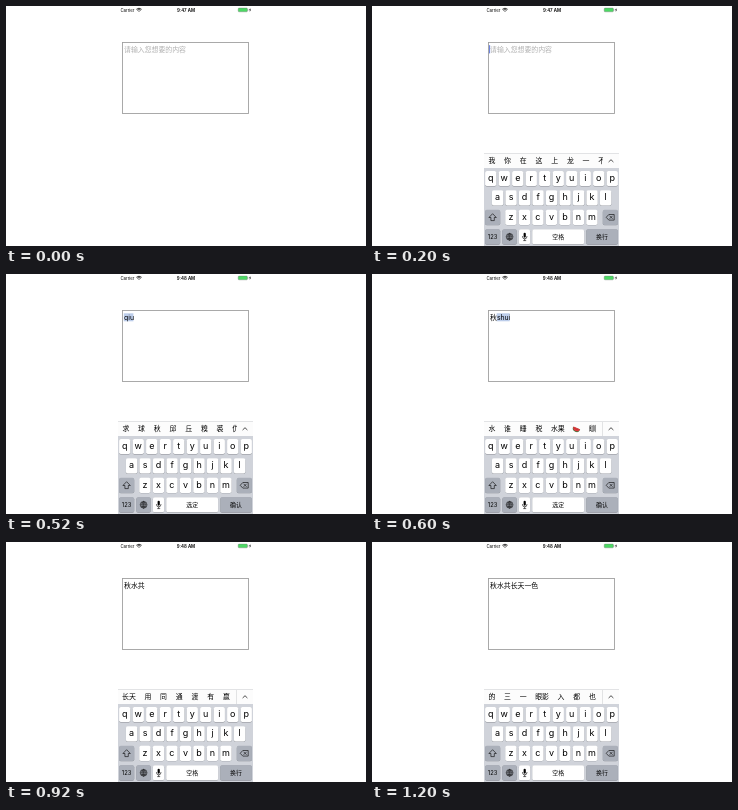
Animation, 360 px wide and 240 px high, one loop 1400 ms. Source, as an HTML page:

```html
<!DOCTYPE html>
<html lang="zh-CN">
<head>
<meta charset="utf-8">
<title>Pinyin typing</title>
<style>
html, body { margin: 0; width: 100%; height: 100%; overflow: hidden; background: #fff; }
svg { display: block; width: 360px; height: 240px; }
text { font-family: Inter, "Noto Sans CJK SC", "Noto Sans CJK", sans-serif; white-space: pre; }
</style>
</head>
<body>
<svg id="stage" viewBox="0 0 360 240">
  <g id="status">
    <text x="114.4" y="5.7" font-size="4.3">Carrier</text>
    <g fill="none" stroke="#000" stroke-width=".8">
      <path d="M130.4 3.3q2.6-2.2 5.2 0M131.3 4.3q1.7-1.4 3.4 0"/>
      <path d="M132.2 4.9h1.6l-.8 .9z" fill="#000" stroke="none"/>
    </g>
    <rect x="232.2" y="2.1" width="9.2" height="3.7" rx=".8" fill="#4cd964" stroke="#777" stroke-width=".4"/>
    <path d="M241.9 3.2v1.5" stroke="#777" stroke-width=".5"/>
    <path d="M244.3 1.9l-1.2 2.3h.9l-.3 1.9 1.3-2.5h-.9z"/>
  </g>
  <rect x="116.5" y="36.5" width="126" height="71" fill="none" stroke="#a0a0a0" stroke-width=".9"/>
  <g id="live"></g>
  <g id="keyboard"></g>
  <g id="labels"></g>
</svg>
<script>
const STEP = 200;
const UNIT = 0.36;   // one phone point in stage pixels
const LEFT = 112;
const HINT = '请输入您想要的内容';
const IDLE = ['空格', '换行'], PICK = ['选定', '确认'];

const scenes = [
  { time: '9:47 AM', hint: true },
  { time: '9:47 AM', hint: true, caret: true, words: '我 你 在 这 上 龙 一 不', keys: IDLE },
  { time: '9:48 AM', marked: 'qiu', markWidth: 9.6, words: '求 球 秋 邱 丘 糗 裘 仇', keys: PICK },
  { time: '9:48 AM', typed: '秋', marked: 'shui', markWidth: 13, words: '水 谁 睡 税 水果 🍉 瞓', keys: PICK },
  { time: '9:48 AM', typed: '秋水共', words: '长天 用 同 通 渡 有 赢', keys: IDLE },
  { time: '9:48 AM', typed: '秋水共长天', words: '一 一色 了 的 于 三 多少', keys: IDLE },
  { time: '9:48 AM', typed: '秋水共长天一色', words: '的 三 一 眼影 入 都 也', keys: IDLE }
];

const $ = id => document.getElementById(id);
const rect = (x, y, w, h, fill, extra = '') =>
  `<rect x="${x}" y="${y}" width="${w}" height="${h}" fill="${fill}" ${extra}/>`;
const text = (s, x, y, size, extra = '') =>
  `<text x="${x}" y="${y}" font-size="${size}" ${extra}>${s}</text>`;
const centered = (s, x, y, size, extra = '') => text(s, x, y, size, 'text-anchor="middle" ' + extra);
const line = (d, width = 0.6, color = '#000') =>
  `<path d="${d}" fill="none" stroke="${color}" stroke-width="${width}"/>`;

const rowTop = row => 164.9 + row * 54 * UNIT;

function key(at, width, row, fill = '#fff') {
  const x = LEFT + at * UNIT, w = width * UNIT, h = 42 * UNIT, y = rowTop(row);
  return rect(x, y + 0.4, w, h, '#898c92', 'rx="1.7"') + rect(x, y, w, h, fill, 'rx="1.7"');
}

function keyboard() {
  const gray = '#abb0ba';
  let out = rect(LEFT, 147, 135, 15.4, '#fcfcfc') + rect(LEFT, 162, 135, 78, '#d0d3da') +
    line('M112 147.5h135', 0.5, '#c6c8cc') + line('M236.6 156l2.4-2.3 2.4 2.3', 0.7);
  [['qwertyuiop', 3], ['asdfghjkl', 22], ['zxcvbnm', 59]].forEach(([letters, start], row) => {
    [...letters].forEach((c, i) => {
      const at = start + i * 37.5;
      out += key(at, 31.5, row) + centered(c, LEFT + (at + 15.75) * UNIT, rowTop(row) + 10.1, 9);
    });
  });
  out += key(3, 42, 2, gray) + key(330, 42, 2, gray) +
    key(3, 42, 3, gray) + key(51, 40, 3, gray) + key(97, 31, 3) +
    key(134, 144, 3) + key(284, 88, 3, gray);
  out += centered('123', 120.6, 232.9, 5.8);
  // shift and delete
  out += line('M120.6 207.7l3.7 3.8h-2v3.1h-3.4v-3.1h-2z');
  out += line('M234.2 211.3l2.6-2.8h5.4v5.6h-5.4zM237.6 209.8l3 3m0-3l-3 3');
  // globe
  out += '<g fill="none" stroke="#000" stroke-width=".5"><circle cx="137.6" cy="230.8" r="3.4"/>' +
    '<ellipse cx="137.6" cy="230.8" rx="1.6" ry="3.4"/>' +
    '<path d="M137.6 227.4v6.8M134.2 230.8h6.8M134.9 229h5.4M134.9 232.6h5.4"/></g>';
  // microphone
  out += rect(151.6, 226.7, 2.2, 5, '#000', 'rx="1.1"') +
    line('M150.5 230v.6a2.2 2.2 0 0 0 4.4 0v-.6M152.7 232.8v1.8M151.2 234.6h3');
  return out;
}

const melon = x => `<g transform="translate(${x} 154.2) rotate(22)">
  <path d="M-3.8 0a3.8 3.8 0 0 0 7.6 0z" fill="#38783c"/>
  <path d="M-3.5-.4a3.4 3.4 0 0 0 7 0z" fill="#e0393e"/>
  <path d="M-1.4.7v.5M.2 1.2v.5M1.5.5v.5" stroke="#5b1518" stroke-width=".4"/></g>`;

function candidates(words) {
  let x = LEFT, out = '';
  for (const word of words.split(' ')) {
    const width = word.length > 1 && word !== '🍉' ? 22 : 15.7, mid = x + width / 2;
    out += word === '🍉' ? melon(mid) : centered(word, mid, 157.3, 6.9);
    x += width;
  }
  const divider = x < 230 ? line('M230.5 148v14', 0.5, '#c8cacd') : '';
  return `<svg x="0" y="0" width="231" height="240">${out}</svg>` + divider;
}

function draw(s) {
  const size = 6.9, { typed = '', marked = '' } = s;
  const end = 118 + typed.length * size;
  let out = centered(s.time, 180, 5.7, 4.4, 'font-weight="600"');
  if (s.hint) out += text(HINT, 118, 45.9, size, 'fill="#b0b0b0"');
  if (s.caret) out += rect(117.2, 39.2, 0.9, 8.2, '#4a66d6');
  if (marked) out += rect(end - 0.2, 39.3, s.markWidth, 8, '#bccdea');
  out += text(typed, 118, 45.9, size) + text(marked, end, 45.9, size);
  $('live').innerHTML = out;

  $('keyboard').style.display = s.keys ? '' : 'none';
  $('labels').innerHTML = s.keys
    ? candidates(s.words) + centered(s.keys[0], 186.2, 232.9, 5.9) + centered(s.keys[1], 230, 232.9, 5.9)
    : '';
}

$('keyboard').innerHTML = keyboard();
let shown = -1;
function tick() {
  const now = Math.floor(performance.now() / STEP) % scenes.length;
  if (now !== shown) draw(scenes[shown = now]);
  requestAnimationFrame(tick);
}
tick();
</script>
</body>
</html>
```
